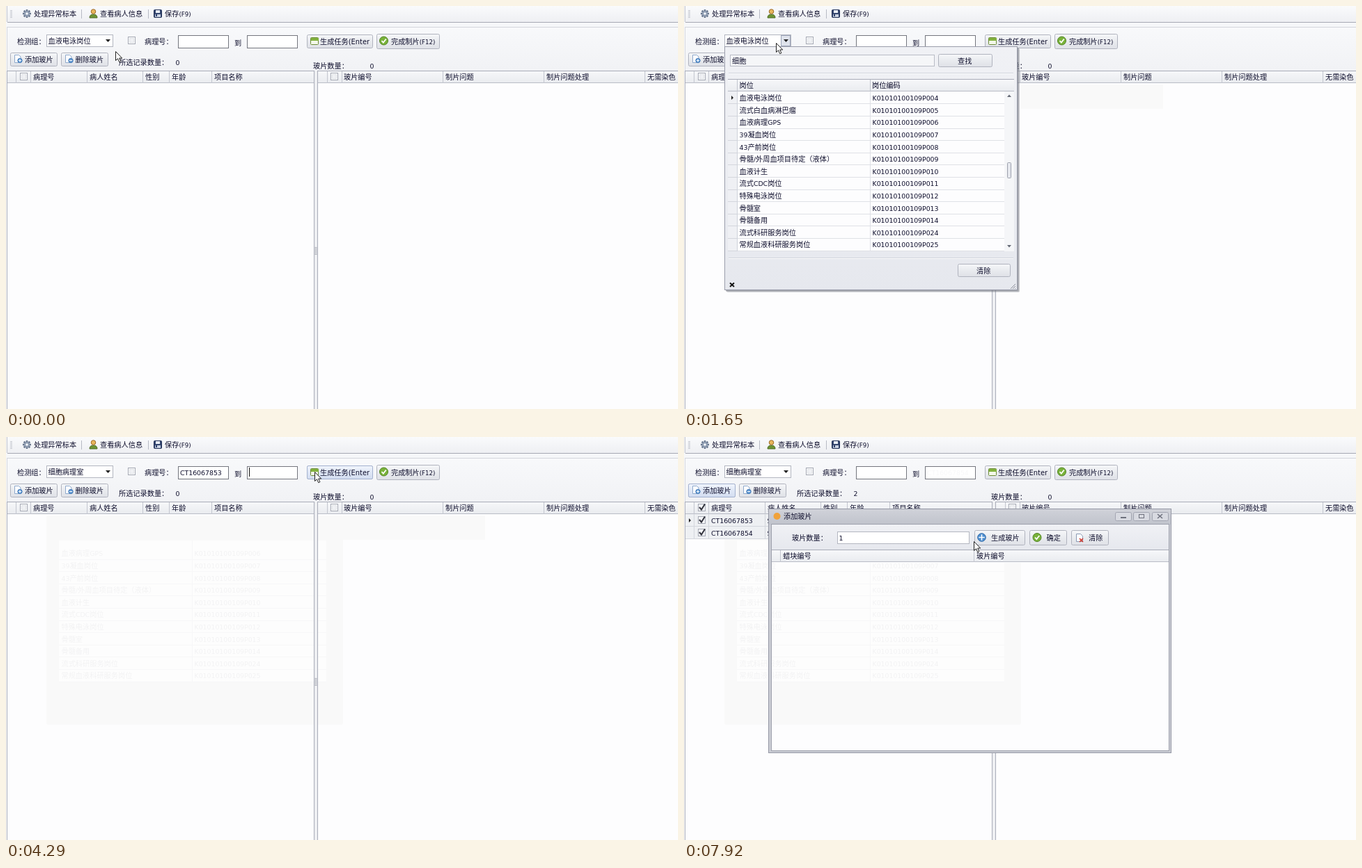
These frames come from a looping animation (965 px wide and 580 px high, 8000 ms). An HTML page:

```html
<!DOCTYPE html>
<html lang="zh-CN">
<head>
<meta charset="utf-8">
<style>
html, body { margin: 0; width: 100%; height: 100%; overflow: hidden; background: #fdfdfe; }
svg { display: block; width: 965px; height: 580px; }
text { font: 10.2px "Noto Sans CJK SC", "Noto Sans CJK", sans-serif; white-space: pre; }
.n { font-family: "DejaVu Sans", sans-serif; }
.b { font: bold 12.5px "Liberation Sans", Arial, sans-serif; }
.c { font-size: 13.5px; }
.c tspan { font-size: 12px; font-family: "Liberation Sans", sans-serif; }
.c .pinyin { font-size: 11px; }
.wide text { font-size: 10.9px; }
.wide .hit { font-weight: bold; }
</style>
</head>
<body>
<svg id="stage" viewBox="0 0 965 580" xmlns="http://www.w3.org/2000/svg"></svg>
<script>
const STEP = 330, LOOP = 8000, LAST = 24;
const INK = '#0e0e2c', EDGE = '#a9acb8', RULE = '#dfe1e6';

const rect = (x, y, w, h, fill, extra = '') =>
  `<rect x="${x}" y="${y}" width="${w}" height="${h}" fill="${fill}" ${extra}/>`;
// One-pixel outline from (x, y) to (r, b), both inclusive
const box = (x, y, r, b, fill, stroke = EDGE, rx = 0) =>
  rect(x + .5, y + .5, r - x, b - y, fill, `stroke="${stroke}" rx="${rx}"`);
const path = (d, fill, stroke = 'none', w = 1) =>
  `<path d="${d}" fill="${fill}" stroke="${stroke}" stroke-width="${w}"/>`;
const vline = (x, y, h, c = RULE) => rect(x, y, 1, h, c);
const hline = (x, y, w, c = RULE) => rect(x, y, w, 1, c);
const circle = (x, y, r, fill, extra = '') => `<circle cx="${x}" cy="${y}" r="${r}" fill="${fill}" ${extra}/>`;
// Text centred vertically on y; latin runs use their own face and size
const text = (x, y, s, fill = INK, size = 9.35) =>
  `<text x="${x}" y="${y + 3.8}" fill="${fill}">` +
  s.replace(/[\x21-\x7e]+/g, m => `<tspan class="n" font-size="${size}">${m}</tspan>`) + '</text>';
const during = (from, to, body) => `<g data-from="${from}" data-to="${to}">${body}</g>`;
const at = (x, y, body) => `<g transform="translate(${x} ${y})">${body}</g>`;

const button = (x, y, r, b, hot) =>
  box(x, y, r, b, hot ? 'url(#hot)' : 'url(#btn)', hot ? '#a3b1cf' : '#b0b3be', 2);
const check = (x, y, on) => box(x, y, x + 10, y + 10, on ? '#f4f5f8' : '#fff', '#a4a8b3') +
  box(x + 2, y + 2, x + 8, y + 8, on ? 'none' : '#f0f1f4', on ? 'none' : '#dfe2e6') +
  (on ? path(`M${x + 2} ${y + 5}l3 3.5 5-8`, 'none', '#33343e', 2) : '');
const field = (x, y, r, b, c = '#74767e', fill = '#fff') => box(x, y, r, b, fill, c);
const caret = (x, y) => vline(x, y, 13, '#111');
const marker = (x, y) => path(`M${x} ${y - 3}l3 3-3 3z`, '#222');

const tick = (x, y) => circle(x, y, 6, '#79b23a', 'stroke="#528425"') +
  path(`M${x - 3} ${y}l2.3 2.5 4-5`, 'none', '#fff', 1.8);
const plus = (x, y, r) => circle(x, y, r, '#4f8fd0', 'stroke="#2f68a8"') +
  path(`M${x - r + 1.5} ${y}h${2 * r - 3}M${x} ${y - r + 1.5}v${2 * r - 3}`, 'none', '#fff', 1.6);
// Page icon with a small round badge
const sheet = (x, y, minus) => path(`M${x} ${y}h6l2.5 2.5v8.500h-8.500z`, '#fbfcff', '#8fa9cb') +
  circle(x + 7.5, y + 8, 3.2, '#5b95d2', 'stroke="#3f74b0" stroke-width=".8"') +
  path(`M${x + 5.5} ${y + 8}h4` + (minus ? '' : 'm-2-2v4'), 'none', '#fff', 1.2);

const defs = () => {
  const grad = (id, ...cs) => `<linearGradient id="${id}" x2="0" y2="1">` +
    cs.map((c, i) => `<stop offset="${i / (cs.length - 1)}" stop-color="${c}"/>`).join('') + '</linearGradient>';
  return '<defs>' + grad('btn', '#f6f7f9', '#e9ebef', '#dfe1e7') + grad('hot', '#f1f5fc', '#dfe7f6', '#d3ddf0') +
    grad('bar', '#fafbfc', '#eeeff3') + grad('panel', '#f8f9fb', '#f1f2f5') + grad('head', '#f7f8fa', '#e9ebef') +
    grad('pop', '#f0f1f5', '#e6e8ee') + grad('title', '#d0d2d9', '#c0c3cc') + grad('ime', '#d4ded7', '#dbe4dd', '#c5d0c8') +
    '<linearGradient id="mist"><stop stop-color="#7d8c84" stop-opacity="0"/><stop offset="1" stop-color="#7d8c84" stop-opacity=".6"/></linearGradient>' +
    '<filter id="soft"><feGaussianBlur stdDeviation="2.5"/></filter>' +
    '<clipPath id="imeClip"><rect x="75" y="90" width="613" height="58" rx="4"/></clipPath>' +
    '<clipPath id="listClip"><rect x="63" y="105" width="411" height="248"/></clipPath>' +
    '<clipPath id="bodyClip"><rect x="126" y="181" width="570" height="270"/></clipPath>' +
    '<clipPath id="taskClip"><rect x="433" y="40" width="90" height="22"/></clipPath></defs>';
};

const toolbar = () => {
  const teeth = [0, 45, 90, 135].map(a => `<rect x="-1.3" y="-6" width="2.6" height="12" fill="#66758c" transform="rotate(${a})"/>`).join('');
  let s = rect(0, 0, 965, 30, '#f6f7f9') + rect(2, 0, 963, 23, 'url(#bar)') + hline(2, 23, 963, '#a6a8b3') + vline(1, 0, 23, '#c4c6ce');
  for (let y = 6; y < 17; y += 2) s += rect(6, y, 3, 1, '#c3c6ce');
  s += at(30, 11, teeth + circle(0, 0, 4.2, '#8d9bb0') + circle(0, 0, 1.8, '#f5f7fa')) + text(40, 11, '处理异常标本');
  s += vline(108, 5, 13, '#b7bac4') + path('M120 17q0-5 5.500-5t5.500 5z', '#6e9435', '#4d6b24') +
    circle(125.5, 8, 3.3, '#e9b75c', 'stroke="#9c6827"') + text(135, 11, '查看病人信息');
  s += vline(204, 5, 13, '#b7bac4') + box(212, 5, 223, 16, '#34466f', '#202f55', 1) + rect(215, 6, 6, 4, '#e8edf6') +
    rect(214, 12, 8, 4, '#c9d2e2') + rect(215, 12, 2, 3, '#34466f');
  return s + text(228, 11, '保存(F9)', INK, 8.7);
};

const panel = () => {
  let s = rect(1, 30, 964, 63, 'url(#panel)') + hline(1, 30, 964, '#d3d5dc') + vline(1, 30, 63, '#d3d5dc');
  s += text(16, 51, '检测组：') + box(58, 41, 153, 58, '#fff', '#b3b6c0');
  s += during(3, 8, box(139, 42, 152, 57, '#dfe3ec', '#9ca4b8')) + path('M143 48h7l-3.500 4z', '#222');
  s += during(0, 8, text(60.5, 50, '血液电泳岗位')) + during(9, 10, rect(59, 43, 54, 14, '#3399ff') + text(60.5, 50, '细胞病理室', '#fff')) +
    during(11, LAST, text(60.5, 50, '细胞病理室'));
  s += check(175, 44) + text(199, 51, '病理号：') + field(247, 42, 319, 60) + text(328, 53, '到') + field(346, 42, 418, 60);
  const blue = (x, a, b) => during(a, b, box(x, 42, x + 72, 60, '#fff', '#3d8fdc'));
  s += blue(247, 10, 12) + blue(247, 20, 23) + blue(346, 12, 12);
  s += during(11, 18, text(250, 51, 'CT16067853')) + during(14, 15, text(349, 51, 'CT16067853')) +
    during(16, 19, text(349, 51, 'CT16067854')) + during(20, LAST, text(349, 51, 'CT16067854', '#f8f8f9'));
  s += during(12, 13, caret(349, 44)) + during(14, 14, caret(409, 44)) + during(16, 17, caret(409, 44)) + during(20, 21, caret(250, 44));
  s += button(432, 41, 526, 60) + during(12, 20, button(432, 41, 526, 60, true));
  s += box(437, 45, 448, 55, '#f3f8e9', '#6c8b38', 1) + rect(438, 46, 11, 4, '#83b23f') +
    `<g clip-path="url(#taskClip)">${text(451, 51, '生成任务(Enter)', INK, 9.9)}</g>`;
  s += button(532, 40, 622, 61) + tick(542.5, 50) + text(553, 51, '完成制片(F12)', INK, 8.6);
  s += button(6, 67, 73, 86) + during(22, LAST, button(6, 67, 73, 86, true)) + sheet(12.5, 70.5) + text(27, 77, '添加玻片');
  s += button(79, 67, 146, 86) + sheet(85.5, 70.5, true) + text(99.5, 77, '删除玻片');
  s += text(162, 81, '所选记录数量：') + during(0, 19, text(243.5, 81, '0')) + during(20, LAST, text(243.5, 81, '2'));
  return s + text(441, 86, '玻片数量：') + text(522.5, 86, '0');
};

const header = (x, r, y, h, seps, labels) => rect(x, y, r - x, h, 'url(#head)') + hline(x, y, r - x, EDGE) +
  hline(x, y + h - 1, r - x, '#b9bcc6') + seps.map(c => vline(c, y + 1, h - 1, '#c3c6cf')).join('') +
  labels.map(([c, s]) => text(c, y + 9.5, s)).join('');

const grids = () => {
  const cols = [14, 35, 116, 196, 234, 295];
  let s = header(1, 442, 93, 18, cols, [[39, '病理号'], [120, '病人姓名'], [200, '性别'], [238, '年龄'], [299, '项目名称']]) +
    header(448, 965, 93, 18, [461, 482, 627, 772, 917], [[485, '玻片编号'], [631, '制片问题'], [776, '制片问题处理'], [921, '无需染色']]);
  s += check(20, 96) + check(466, 96);
  let rows = check(20, 96, true);
  [['CT16067853', 'SIT测011704', '女'], ['CT16067854', 'SIT测011705', '男']].forEach(([id, who, sex], i) => {
    const y = 111 + i * 18;
    rows += rect(2, y, 440, 18, '#eef0f3') + hline(2, y + 17, 440, '#d4d7dd') + cols.map(c => vline(c, y, 18, '#d4d7dd')).join('') +
      check(20, y + 3, true) + text(39, y + 9.5, id) + text(119.5, y + 9.5, who) + text(200, y + 9.5, sex) +
      text(299, y + 9.5, '超薄液基细胞学检测-宫颈');
  });
  s += during(20, LAST, rows + marker(7, 120));
  s += vline(1, 93, 487, EDGE) + rect(442, 93, 6, 487, '#eff0f3') + vline(442, 93, 487, EDGE) + vline(447, 93, 487, EDGE);
  for (let y = 347; y < 358; y += 2) s += rect(443.5, y, 3, 1, '#a3a6af');
  return s;
};

const posts = ['血液电泳岗位', '流式白血病淋巴瘤', '血液病理GPS', '39凝血岗位', '43产前岗位', '骨髓/外周血项目待定（液体）', '血液计生',
  '流式CDC岗位', '特殊电泳岗位', '骨髓室', '骨髓备用', '流式科研服务岗位', '常规血液科研服务岗位'];
const code = i => 'K01010100109P0' + String(i < 11 ? i + 4 : i + 13).padStart(2, '0');
const rowY = i => 132.3 + i * 17.6;
const postRows = (first, ink, rule) => posts.map((p, i) => i < first ? '' :
  text(79.5, rowY(i), p, ink) + text(270.5, rowY(i), code(i), ink) + hline(76, Math.round(rowY(i) + 8), 384, rule)).join('') +
  vline(267, first ? 149 : 123, first ? 204 : 230, rule);

const faintRows = () => postRows(2, '#f2f2f3', '#f7f7f8');
const faint = () => during(5, LAST, rect(484, 113, 204, 35, '#f9f9f9')) +
  during(9, LAST, `<g id="faint">${rect(58, 113, 426, 301, '#f9f9f9', 'rx="3"') + rect(76, 149, 384, 204, '#fdfdfd') + faintRows()}</g>`);

const popup = () => {
  const cap = x => header(63, 474, 105, 18, [76, x], [[79.5, '岗位'], [x + 3, '岗位编码']]);
  let s = rect(61, 61, 421, 351, '#70747e', 'opacity=".35" rx="2"') + rect(60, 60, 420.5, 350.5, '#70747e', 'opacity=".5"') +
    box(58, 58, 478, 408, 'url(#pop)', '#9a9dab');
  s += field(66, 70, 359, 86, '#b9bcc6', '#f5f6f8') + button(365, 69, 442, 87) + text(393, 79, '查找');
  s += hline(64, 96, 409, '#d2d5dd') + hline(64, 97, 409, '#fafafc') + rect(63, 105, 411, 248, '#fdfdfe');
  let list = rect(63, 123, 13, 230, '#eff0f4') + postRows(0, INK, RULE) + vline(76, 123, 230, '#cfd2da') + marker(68, 132) + cap(267);
  for (let i = 0; i < 13; i++) list += hline(63, Math.round(rowY(i) + 8), 13, '#d4d6dd');
  list += rect(460, 123, 14, 230, '#f5f6f8') + box(464, 225, 469, 247, '#e6e8ee', '#9da1ad', 1) +
    path('M464 344h6l-3 3.500z', '#666a76') + path('M464 131h6l-3-3.500z', '#666a76');
  const hit = (x, y) => rect(x, y - 6, 22, 13, '#ffd500') + `<g class="hit">${text(x, y, '细胞')}</g>`;
  const found = rect(63, 158, 13, 195, '#f9f9fa') + faintRows() + rect(442, 149, 5, 204, '#f7f7f8') + rect(460, 149, 14, 204, '#f8f8f9') +
    cap(275) + rect(63, 123, 13, 35, '#eff0f4') + rect(77, 123, 397, 35, '#fdfdfe') +
    hline(63, 140, 411) + hline(63, 158, 411) + vline(76, 123, 35, '#cfd2da') + vline(275, 123, 35) +
    `<g class="wide">${hit(79.5, 132) + text(101.3, 132, '病理室') + text(79.5, 150, '多重组学与') + hit(134, 150) +
      text(155.8, 150, '生物学科研岗位')}</g>` +
    text(278, 132, 'K01010100112P001') + text(278, 150, 'K01010100117P006') + during(8, 8, marker(68, 132));
  s += `<g clip-path="url(#listClip)">${during(2, 5, list) + during(6, 8, found)}</g>`;
  s += during(2, 3, caret(70, 72)) + during(5, 8, text(69, 79, '细胞'));
  s += hline(64, 362, 409, '#d2d5dd') + hline(64, 363, 409, '#fafafc') + button(393, 371, 468, 389) + text(420, 381.5, '清除');
  s += path('M66 398.500l6 5.500m0-5.500l-6 5.500', 'none', '#111', 1.9);
  return during(2, 8, s + path('M469 407l7-7m-4 7l4-4m-1 4l1-1', 'none', '#8d909c'));
};

const ime = () => {
  const cands = [[85, '1.细胞'], [136, '2.喜报'], [187, '3.喜宝'], [239, '4.西宝'], [290, '5.希宝'], [341, '6.西堡'],
    [392, '7.稀薄(bó)'], [463, '8.铣(xiān)刨'], [542, '9.西']];
  const word = ([x, s]) => `<text class="c" x="${x}" y="139" fill="#2f5b55">` +
    s.replace(/^\d\./, '<tspan>$& </tspan>').replace(/\(.+\)/, '<tspan class="pinyin">$&</tspan>') + '</text>';
  const birds = [[588, 98], [595, 101], [590, 105], [599, 98], [598, 107]].map(([x, y]) => `M${x - 2} ${y - 1}l2 1.500 2.500-2`).join('');
  // Misty lake with a small pavilion
  const haze = path('M655 121q12-8 36-12v22h-36z', '#4f6058') + path('M608 129h84v8q-40-2-84-3z', '#4f6058') +
    path('M625 137h28l-6 9h-16z', '#76857d') + path('M660 136h32v12h-26z', '#6c7b73');
  const art = rect(560, 90, 128, 58, 'url(#mist)') + `<g filter="url(#soft)" opacity=".85">${haze}</g>` +
    path('M634 98l2 4q7 4 20 7l-1 3h-42l-1-3q13-3 20-7z', '#3f4f48') +
    path('M618 112v16m8-16v16m16-16v16m8-16v16M614 128h41', 'none', '#4f6058', 1.5) +
    path('M606 139h34m8 3h32', 'none', '#a9b6ae', 1) + path(birds, 'none', '#4a5a53', 1.2);
  let s = rect(75, 90, 613, 58, 'url(#ime)', 'rx="4"') +
    `<g clip-path="url(#imeClip)">${art}</g>` + box(75, 90, 687, 147, 'none', '#aebbb2', 4);
  s += hline(81, 121, 500, '#b9c6bd') + hline(81, 122, 500, '#eef3ef');
  s += `<text class="b" x="85" y="110" fill="#1f5349">xi'bc</text><text class="b" x="146" y="110" fill="#f5761a">[xi'bao]</text>` + caret(112, 99);
  s += cands.map(word).join('') + path('M585 130v9l-5-4.500z', '#9fb0a7') + path('M590 129v11l5.500-5.500z', '#1d5248');
  return during(4, 4, s);
};

const dialog = () => {
  let s = box(121, 103, 699, 454, '#caccd4', '#9699a6') + rect(122, 104, 577, 22, 'url(#title)') +
    circle(133.5, 114, 5, '#f0a23a') + text(143, 114.5, '添加玻片');
  [619, 645, 672].forEach(x => s += box(x, 108, x + 23, 120, '#d8dae1', '#a2a5b1', 2));
  s += rect(627, 115, 8, 2, '#6e717d') + box(653, 111, 660, 116, 'none', '#6e717d') + path('M680 111l7 6m0-6l-7 6', 'none', '#6e717d', 1.6);
  s += box(125, 125, 696, 451, '#fdfdfe', '#9da0ac') + rect(126, 126, 570, 36, 'url(#pop)');
  s += text(155, 145.5, '玻片数量：') + field(220, 136, 409, 153, '#b3b6c0') + text(222.5, 145, '1');
  s += button(417, 134, 489, 155) + plus(427.5, 144.5, 5.8) + text(441, 145.5, '生成玻片') +
    button(496, 134, 549, 155) + tick(507, 144.5) + text(520.5, 145.5, '确定') +
    button(556, 134, 609, 155) + path('M563.500 139.500h6l3 3v8h-9z', '#fbfcff', '#8a9ab4') +
    path('M568 146l5 5m0-5l-5 5', 'none', '#d23b30', 1.7) + text(581, 145.5, '清除');
  s += header(126, 696, 162, 18, [138, 416], [[142, '蜡块编号'], [420, '玻片编号']]);
  return s + `<g clip-path="url(#bodyClip)"><use href="#faint"/></g>`;
};

const arrow = path('M.5.5v13l3-2.800 2.200 5 2.200-1-2.200-4.700h4z', '#fff', '#222');
const beam = path('M-2-7h4m-2 0v14m-2 0h4', 'none', '#222');
// Each stop: first step, x, y; no place means the pointer is hidden
const stops = [[0, 157, 65], [1, 132, 53], [7, 261, 122], [8, 160, 129], [9, 237, 65], [10], [11, 458, 56], [12, 485, 50],
  [13, 443, 50], [16], [21, 81, 78], [22, 70, 72], [24, 416, 150]];

const stage = document.getElementById('stage');
stage.innerHTML = defs() + rect(0, 0, 965, 580, '#fdfdfe') + toolbar() + panel() + faint() + grids() + popup() + ime() +
  during(23, LAST, `<g id="dialog">${dialog()}</g>`) + during(10, 10, at(283, 51, beam)) + `<g id="pointer">${arrow}</g>`;
const layers = [...stage.querySelectorAll('[data-from]')];
const pointer = document.getElementById('pointer');
const win = document.getElementById('dialog');

function draw(ms) {
  const step = Math.min(LAST, Math.floor(ms % LOOP / STEP));
  for (const g of layers)
    g.style.display = step >= +g.dataset.from && step <= +g.dataset.to ? '' : 'none';
  const [, x, y] = stops.filter(s => s[0] <= step).pop();
  pointer.style.display = x === undefined ? 'none' : '';
  if (x !== undefined) pointer.setAttribute('transform', `translate(${x} ${y})`);
  // The window is still growing in when it first shows
  const k = step < LAST ? .993 : 1;
  win.setAttribute('transform', `translate(${410 * (1 - k)} ${279 * (1 - k)}) scale(${k})`);
  win.setAttribute('opacity', step < LAST ? .92 : 1);
}

const start = performance.now();
function loop() {
  draw(performance.now() - start);
  requestAnimationFrame(loop);
}
loop();
</script>
</body>
</html>
```
